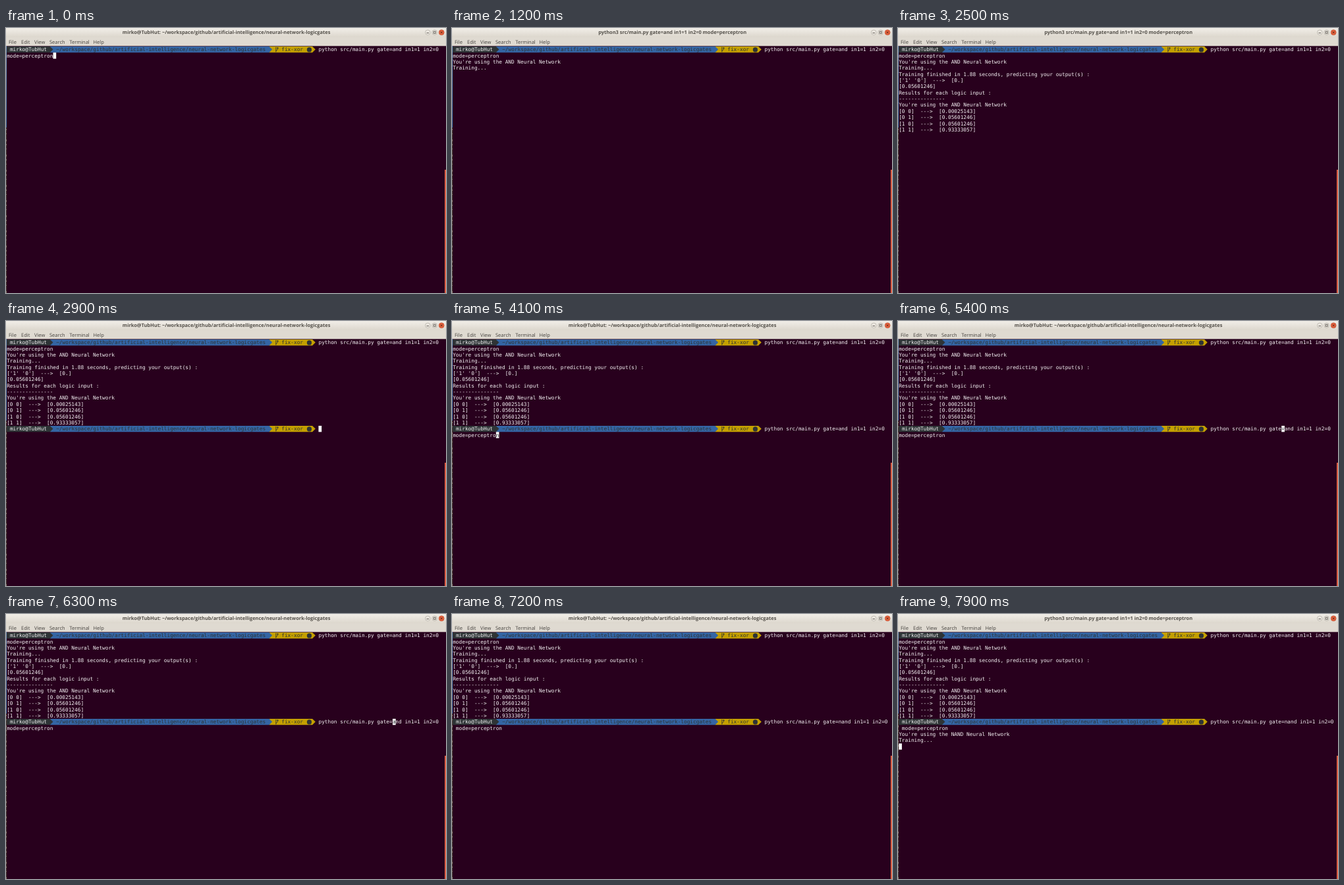
An HTML page that plays this animation: 668x402 px, repeating every 8000 ms.

```html
<!DOCTYPE html>
<html lang="en">
<head>
<meta charset="utf-8">
<title>Terminal</title>
<style>
  html, body { margin: 0; width: 100%; height: 100%; overflow: hidden; background: #28001d; }
  svg { display: block; width: 668px; height: 402px; }
  text { white-space: pre; text-rendering: geometricPrecision; }
  .ui { font: 7.5px "Open Sans", "Noto Sans", sans-serif; fill: #45423e; }
  .title { font-size: 7.45px; font-weight: 700; fill: #55514b; }
  .mono { font: 7.783px "DejaVu Sans Mono", monospace; fill: #f4f2f3; }
  .mono .dark { fill: #2e3436; }
</style>
</head>
<body>
<svg id="stage" viewBox="0 0 668 402">
  <defs>
    <linearGradient id="bar" x2="0" y2="1">
      <stop offset="0" stop-color="#f1eee8"/>
      <stop offset="1" stop-color="#dcd6cc"/>
    </linearGradient>
    <linearGradient id="edge" x2="0" y2="1">
      <stop offset="0" stop-color="#7f9fc2"/>
      <stop offset="1" stop-color="#4778ad"/>
    </linearGradient>
  </defs>
  <rect width="668" height="402" fill="#28001d"/>
  <rect width="668" height="14.5" fill="url(#bar)"/>
  <rect y="14" width="668" height="13.3" fill="#dfdad1"/>
  <rect y="27" width="1" height="124" fill="url(#edge)"/>
  <path d="M.5 151V402" stroke="#4b4039"/>
  <path d="M.5 153V402" stroke="#8a7c6c" stroke-dasharray="2 5 1 8 3 4"/>
  <rect x="666" y="215" width="2" height="187" fill="#dc6045"/>

  <g fill="#e9e5de" stroke="#aaa49a" stroke-width=".6">
    <circle cx="640.3" cy="6.7" r="3.8"/>
    <circle cx="650.7" cy="6.7" r="3.8"/>
    <circle cx="661.2" cy="6.7" r="4" fill="#e4633f" stroke="#b9492b"/>
  </g>
  <g fill="none" stroke="#5d5851" stroke-width=".9">
    <path d="M638.6 7.5h3.4"/>
    <rect x="649.2" y="5.2" width="3" height="3"/>
    <path d="M659.7 5.2l3 3m0-3l-3 3" stroke="#5b2415"/>
  </g>
  <text id="title" class="ui title" x="334.6" y="9.4" text-anchor="middle"></text>
  <g id="menu" class="ui"></g>
  <g id="screen" class="mono"></g>
</svg>
<script>
const LOOP = 8000, COLS = 141, CMD_COL = 101;
const CELL = { w: 4.686, h: 9.36, x: 1.2, y: 27.9, base: 7.3 };
const USER = "mirko@TubHut";
const PATH = "~/workspace/github/artificial-intelligence/neural-network-logicgates";
const command = gate => `python src/main.py gate=${gate} in1=1 in2=0 mode=perceptron`;
const RUN_TITLE = command("and").replace("python", "python3");
const SHELL_TITLE = `${USER}: ${PATH}`;

// Moments of the session, in ms
const RUN = 400, TRAIN = 600, RESULT = 2500, PROMPT = 2600, RECALL = 3200,
      LEFT = 3700, HELD = 4100, RIGHT = 5800, INSERT = 6400, RERUN = 7700, RETRAIN = 7900;
const BLINK_RESETS = [0, 500, RECALL, LEFT, 4200, 4700, 5200, RIGHT, INSERT, RERUN];

const screen = document.getElementById("screen");
const title = document.getElementById("title");
const colX = col => CELL.x + col * CELL.w;
const rowY = row => CELL.y + row * CELL.h;

function add(parent, tag, attrs, content = "") {
  const el = document.createElementNS("http://www.w3.org/2000/svg", tag);
  for (const key in attrs) el.setAttribute(key, attrs[key]);
  el.textContent = content;
  return parent.appendChild(el);
}

function write(row, col, content, parent = screen, cls = "") {
  return add(parent, "text", { x: colX(col), y: rowY(row) + CELL.base, class: cls }, content);
}

function segment(parent, row, from, to, fill) {
  const top = rowY(row), h = CELL.h;
  add(parent, "path", {
    d: `M${colX(from)} ${top}H${colX(to)}l${CELL.w} ${h / 2}l${-CELL.w} ${h / 2}H${colX(from)}z`, fill
  });
}

function prompt(row) {
  const g = add(screen, "g", {}), top = rowY(row);
  segment(g, row, 85, 99, "#c4a000");
  segment(g, row, 14, 85, "#3465a4");
  segment(g, row, 0, 14, "#2e3436");
  write(row, 1, USER, g);
  write(row, 16, PATH, g, "dark");
  write(row, 89, "fix-xor", g, "dark");
  add(g, "path", {
    d: `M${colX(87) + 1} ${top + 1}v7.6m0-1.6l2.6-2.6v-2.6m-1.1 1.2l1.1-1.4l1.1 1.4`,
    fill: "none", stroke: "#2e3436", "stroke-width": .9
  });
  add(g, "circle", { cx: colX(98), cy: top + 5, r: 3.6, fill: "#2e3436" });
  return g;
}

[["File", 4], ["Edit", 23], ["View", 43], ["Search", 66], ["Terminal", 96.3], ["Help", 132.5]]
  .forEach(([label, x]) => add(document.getElementById("menu"), "text", { x, y: 23.8 }, label));

prompt(0);
write(0, CMD_COL, command("and").slice(0, 40));
write(1, 0, command("and").slice(40));

const timed = [];
const show = (from, el) => timed.push({ from, el });
const print = (from, row, lines) => lines.forEach((line, i) => show(from, write(row + i, 0, line)));

print(TRAIN, 2, ["You're using the AND Neural Network", "Training..."]);
print(RESULT, 4, [
  "Training finished in 1.88 seconds, predicting your output(s) :",
  "['1' '0']  --->  [0.]",
  "[0.05601246]",
  "Results for each logic input :",
  "-".repeat(15),
  "You're using the AND Neural Network",
  "[0 0]  --->  [0.00025143]",
  "[0 1]  --->  [0.05601246]",
  "[1 0]  --->  [0.05601246]",
  "[1 1]  --->  [0.93333057]"
]);
show(PROMPT, prompt(14));
print(RETRAIN, 16, ["You're using the NAND Neural Network", "Training..."]);
const typed = [write(14, CMD_COL, ""), write(15, 0, "")];

const cursor = add(screen, "g", {});
const block = add(cursor, "rect", { width: CELL.w, height: CELL.h, fill: "#fff" });
const under = write(0, 0, "", cursor, "dark");

function editIndex(t) {
  if (t < RECALL) return 0;
  if (t < LEFT) return 55;
  if (t < HELD) return 54;
  if (t < RIGHT) return Math.max(23, 54 - Math.floor((t - HELD) / 35));
  return t < INSERT ? 24 : 25;
}

function cursorCell(t) {
  if (t < RUN) return [1, 15];
  if (t < TRAIN) return [2, 0];
  if (t < RESULT) return [4, 0];
  if (t < PROMPT) return [14, 0];
  if (t >= RETRAIN) return [18, 0];
  if (t >= RERUN) return [16, 0];
  const cell = CMD_COL + editIndex(t);
  return [14 + Math.floor(cell / COLS), cell % COLS];
}

function render(t) {
  const running = (t >= RUN && t < PROMPT) || t >= RERUN;
  title.textContent = running ? RUN_TITLE : SHELL_TITLE;
  for (const { from, el } of timed) el.setAttribute("visibility", t >= from ? "visible" : "hidden");

  const line = t < RECALL ? "" : command(t < INSERT ? "and" : "nand");
  typed[0].textContent = line.slice(0, 40);
  typed[1].textContent = line.slice(40);

  const [row, col] = cursorCell(t);
  const since = t - BLINK_RESETS.filter(k => k <= t).pop();
  cursor.setAttribute("visibility", Math.floor(since / 600) % 2 ? "hidden" : "visible");
  block.setAttribute("x", colX(col));
  block.setAttribute("y", rowY(row));
  under.setAttribute("x", colX(col));
  under.setAttribute("y", rowY(row) + CELL.base);
  under.textContent = t >= RECALL && t < RERUN ? line[editIndex(t)] || "" : "";
}

let last = -1;
function tick() {
  const t = Math.floor(performance.now() % LOOP / 100) * 100;
  if (t !== last) render(last = t);
  requestAnimationFrame(tick);
}
tick();
</script>
</body>
</html>
```
